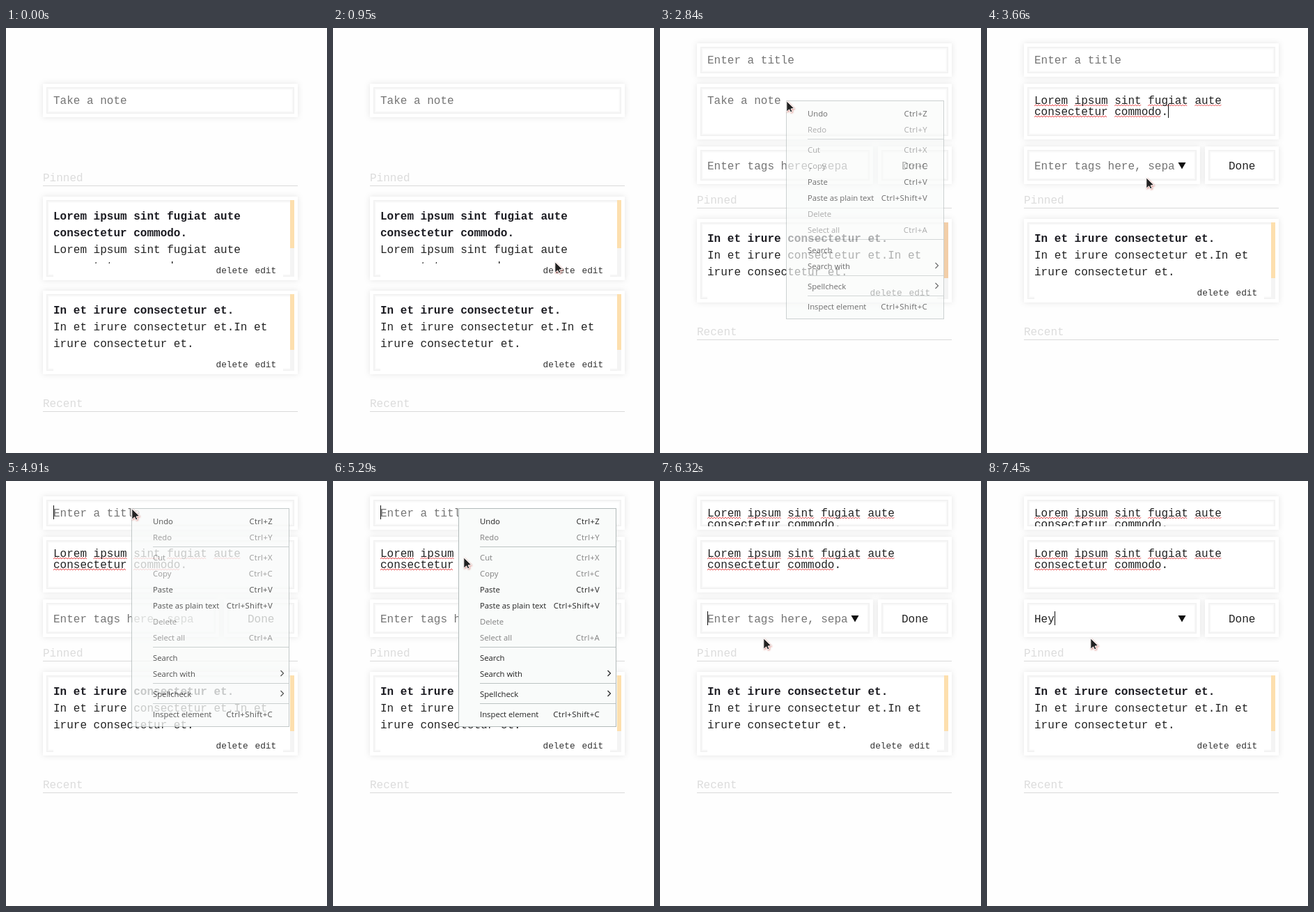
Recreate the animation shown at these times as an HTML page. Size 461 px wide and 610 px high, loop 8 s.

```html
<!DOCTYPE html>
<html lang="en">
<head>
<meta charset="utf-8">
<title>Notes</title>
<style>
html, body { margin: 0; width: 100%; height: 100%; overflow: hidden; background: #fefefe; }
svg { display: block; width: 461px; height: 610px; }
text { font: 16px "Liberation Mono", monospace; fill: #222; white-space: pre; }
.bold { font-weight: 700; fill: #1c1c22; }
.hint { fill: #757575; }
.head { fill: #dcdcdc; }
.link { font-size: 12.8px; fill: #333; }
.menu text { font: 11.3px "Open Sans", "Noto Sans", sans-serif; fill: #222; }
.menu .off { fill: #808080; }
.menu .key { text-anchor: end; letter-spacing: .35px; }
.card { fill: #fff; filter: drop-shadow(0 0 4px rgba(0, 0, 0, .1)); }
.cursor { filter: drop-shadow(1px 1px 1px rgba(200, 80, 70, .6)); }
</style>
</head>
<body>
<svg id="stage" viewBox="0 0 461 610" xmlns="http://www.w3.org/2000/svg">
  <defs>
    <clipPath id="titleClip"><rect x="58" y="27" width="356" height="38"/></clipPath>
  </defs>
  <g id="scene"></g>
</svg>
<script>
const LOOP = 8000, CHAR = 9.6;
const OPEN = 2190, PASTE_NOTE = 3500, FOCUS_TITLE = 3930, PASTE_TITLE = 5670, FOCUS_TAGS = 6070;
const LOREM = ["Lorem ipsum sint fugiat aute", "consectetur commodo."];
const IRURE = ["In et irure consectetur et.", "In et irure consectetur et.In et", "irure consectetur et."];

// Bursts of screen updates: start, end, number of updates.
const BURSTS = [
  [0, 0, 1], [130, 870, 10], [950, 1020, 2], [1420, 1420, 1], [1670, 2270, 9],
  [2750, 3530, 10], [3660, 4200, 8], [4430, 4430, 1], [4810, 5600, 10],
  [5680, 6080, 6], [6280, 6320, 2], [6600, 6600, 1], [7070, 7070, 1],
  [7220, 7220, 1], [7450, 7450, 1]
];

// Pointer path: time, x, y.
const PATH = [
  [130, 385, 555], [430, 340, 420], [700, 308, 292], [870, 310, 320], [950, 318, 335],
  [1020, 322, 345], [1420, 322, 345], [1670, 312, 320], [1895, 191, 139], [2045, 178, 106],
  [2270, 181, 104], [2924, 181, 104], [3357, 228, 214], [3660, 228, 214], [3820, 210, 150],
  [4050, 182, 60], [4200, 180, 39], [5000, 180, 39], [5400, 192, 152], [5512, 192, 152],
  [5600, 180, 162], [5680, 164, 175], [5920, 146, 198], [6080, 143, 205], [6280, 145, 216],
  [6320, 148, 225]
];

// Menu rows: offset, label, shortcut, disabled.
const MENU = [
  [19, "Undo", "Ctrl+Z"], [42, "Redo", "Ctrl+Y", 1], [71, "Cut", "Ctrl+X", 1],
  [94, "Copy", "Ctrl+C", 1], [117, "Paste", "Ctrl+V"], [140, "Paste as plain text", "Ctrl+Shift+V"],
  [163, "Delete", "", 1], [186, "Select all", "Ctrl+A", 1], [215, "Search", ""],
  [238, "Search with", ">"], [267, "Spellcheck", ">"], [296, "Inspect element", "Ctrl+Shift+C"]
];
const MENU_RULES = [55.5, 199.5, 251.5, 280.5];

const within = (t, a, b) => t >= a && t < b;
const clamp = v => Math.max(0, Math.min(1, v));

function snap(t) {
  const [a, b, n] = BURSTS.filter(s => s[0] <= t).pop();
  if (n < 2) return a;
  const step = (b - a) / (n - 1);
  return Math.min(b, a + Math.floor((t - a) / step + 1e-6) * step);
}

function pointAt(t) {
  const i = PATH.findIndex(p => p[0] > t);
  if (i < 0) return PATH[PATH.length - 1].slice(1);
  const [t0, x0, y0] = PATH[i - 1], [t1, x1, y1] = PATH[i];
  const k = (t - t0) / (t1 - t0);
  return [Math.round(x0 + (x1 - x0) * k), Math.round(y0 + (y1 - y0) * k)];
}

const rect = (x, y, w, h, attrs) => `<rect x="${x}" y="${y}" width="${w}" height="${h}" ${attrs}/>`;
const text = (x, y, s, cls = "") => `<text x="${x}" y="${y}" class="${cls}">${s}</text>`;
const caret = (x, y) => rect(Math.floor(x), y - 16, 1, 20, 'fill="#111"');

function card(x, y, w, h) {
  const inset = ["#f1f1f1", "#f4f4f4", "#f9f9f9", "#fcfcfc"].map((c, i) => {
    const d = 5.5 + i;
    return rect(x + d, y + d, w - 2 * d, h - 2 * d, `fill="none" stroke="${c}"`);
  });
  return rect(x, y, w, h, 'class="card"') + inset.join("");
}

function heading(y, s) {
  return text(53, y, s, "head") + rect(53, y + 6, 366, 1, 'fill="#dadada"');
}

function note(y, titles, body, thumb, tint = "#fddfae") {
  const lines = [...titles.map(s => [s, "bold"]), ...body.map(s => [s, ""])];
  return card(53, y, 366, 120) +
    lines.map(([s, cls], i) => text(68, y + 33 + i * 24, s, cls)).join("") +
    rect(68, y + 96, 330, 19, 'fill="#fff"') +
    text(301.5, y + 110, "delete", "link") + text(357.5, y + 110, "edit", "link") +
    rect(408, y + 5, 6, 110, 'fill="#f4f4f4"') + rect(408, y + 5, 6, thumb, `fill="${tint}"`);
}

function wave(x, y, w) {
  let d = `M${x} ${y + 2}`;
  for (let i = 2; i <= w; i += 2) d += `l2 ${i % 4 ? -2 : 2}`;
  return `<path d="${d}" fill="none" stroke="#e5383b" stroke-width=".9"/>`;
}

function pasted(y) {
  return LOREM.map((s, i) => {
    const base = y + i * 16;
    const waves = [...s.matchAll(/\w+/g)]
      .map(m => wave(68 + m.index * CHAR, base + 1, m[0].length * CHAR));
    return waves.join("") + text(68, base, s);
  }).join("");
}

function contextMenu(x, y, opacity) {
  if (opacity <= 0) return "";
  const rows = MENU.map(([dy, label, key, off]) => {
    const cls = off ? "off" : "";
    const right = key === ">"
      ? `<path d="M214.5 ${dy - 5}l4 4-4 4" fill="none" stroke="#222" stroke-width="1.2"/>`
      : text(203, dy + 4, key, "key " + cls);
    return text(31, dy + 4, label, cls) + right;
  });
  const rules = MENU_RULES.map(dy => rect(31, dy - .5, 195, 1, 'fill="#bcc3c3"'));
  return `<g class="menu" transform="translate(${x} ${y})" opacity="${opacity}">` +
    rect(.5, .5, 226, 313, 'fill="#f9fbfa" stroke="#b2baba"') +
    rules.join("") + rows.join("") + "</g>";
}

function pointer(t) {
  if (t < 130) return "";
  const [x, y] = pointAt(t);
  let shape;
  if (within(t, 1000, 1600)) {
    shape = '<path d="M-1 0q2-2 3 0v7l6 1.5q2 .5 2 3l-1 6h-8l-5-7q0-2 3-1z" fill="#222" stroke="#fff"/>';
  } else if (within(t, 1950, 2740) || within(t, 3700, 4800) || within(t, 5590, 6290)) {
    const beam = "M-3.5-8.5h2.5l1 1 1-1h2.5M0-7.5v15M-3.5 8.5h2.5l1-1 1 1h2.5";
    shape = `<path d="${beam}" fill="none" stroke="#fff" stroke-width="4"/>` +
      `<path d="${beam}" fill="none" stroke="#222" stroke-width="1.6"/>`;
  } else {
    shape = '<path d="M.8 .8V16.2L4.6 12.9 6.6 17 9 15.8 7 12 11.8 11.5Z" fill="#222" stroke="#fff"/>';
  }
  return `<g class="cursor" transform="translate(${x} ${y})">${shape}</g>`;
}

function closedForm(t) {
  let s = card(53, 80, 366, 48) + text(68, 109, "Take a note", "hint") + heading(220, "Pinned");
  if (t < 1420) {
    return s + note(242, LOREM, LOREM, 69) + note(377, IRURE.slice(0, 1), IRURE.slice(1), 80) +
      heading(544, "Recent");
  }
  return s + note(242, IRURE.slice(0, 1), IRURE.slice(1), 80) + heading(409, "Recent");
}

function openForm(t) {
  const grow = within(t, PASTE_TITLE, FOCUS_TAGS) ? 16 : 0;
  const typed = "Hey".slice(0, [7070, 7220, 7450].filter(k => t >= k).length);
  let s = card(53, 22, 366, 48 + grow);
  if (t < PASTE_TITLE) s += text(68, 51, "Enter a title", "hint");
  else s += grow ? pasted(51) : `<g clip-path="url(#titleClip)">${pasted(51)}</g>`;

  s += card(53, 80 + grow, 366, 80);
  s += t < PASTE_NOTE ? text(68, 109, "Take a note", "hint") : pasted(109 + grow);

  s += card(53, 170 + grow, 253, 54) + card(313, 170 + grow, 106, 54);
  s += typed ? text(68, 203, typed) : text(68, 203 + grow, "Enter tags here, sepa", "hint");
  s += text(347, 203 + grow, "Done");
  if (within(t, 3600, 3760) || t >= FOCUS_TAGS) s += '<path d="M274.5 193h11l-5.5 9.5z" fill="#111"/>';

  if (within(t, OPEN, 2750)) s += caret(68, 109);
  if (within(t, PASTE_NOTE, FOCUS_TITLE)) s += caret(260, 125);
  if (within(t, FOCUS_TITLE, 4430) || within(t, 4810, PASTE_TITLE)) s += caret(68, 51);
  if (grow) s += caret(260, 67);
  if (within(t, FOCUS_TAGS, 6600) || typed) s += caret(68.4 + typed.length * CHAR, 203);

  const tint = within(t, 2750, 3500) ? "#f2cea8" : undefined;
  s += heading(252 + grow, "Pinned") +
    note(274 + grow, IRURE.slice(0, 1), IRURE.slice(1), 80, tint) +
    heading(441 + grow, "Recent");

  if (within(t, 7070, 7450)) {
    s += rect(53.5, 224.5, 252, 48, 'fill="#fff" stroke="#ccc"') + text(68, 253, "Hello");
  }
  s += contextMenu(181, 104, Math.min(clamp((t - 2735) / 155), clamp((3600 - t) / 140)));
  s += contextMenu(180, 39, Math.min(clamp((t - 4785) / 145), clamp((5670 - t) / 140)));
  return s;
}

const scene = document.getElementById("scene");
let shown = -1;

function draw(now) {
  const t = snap(now % LOOP);
  if (t !== shown) {
    shown = t;
    scene.innerHTML = (t < OPEN ? closedForm(t) : openForm(t)) + pointer(t);
  }
}

const start = performance.now();
function tick() {
  draw(performance.now() - start);
  requestAnimationFrame(tick);
}
tick();
</script>
</body>
</html>
```
